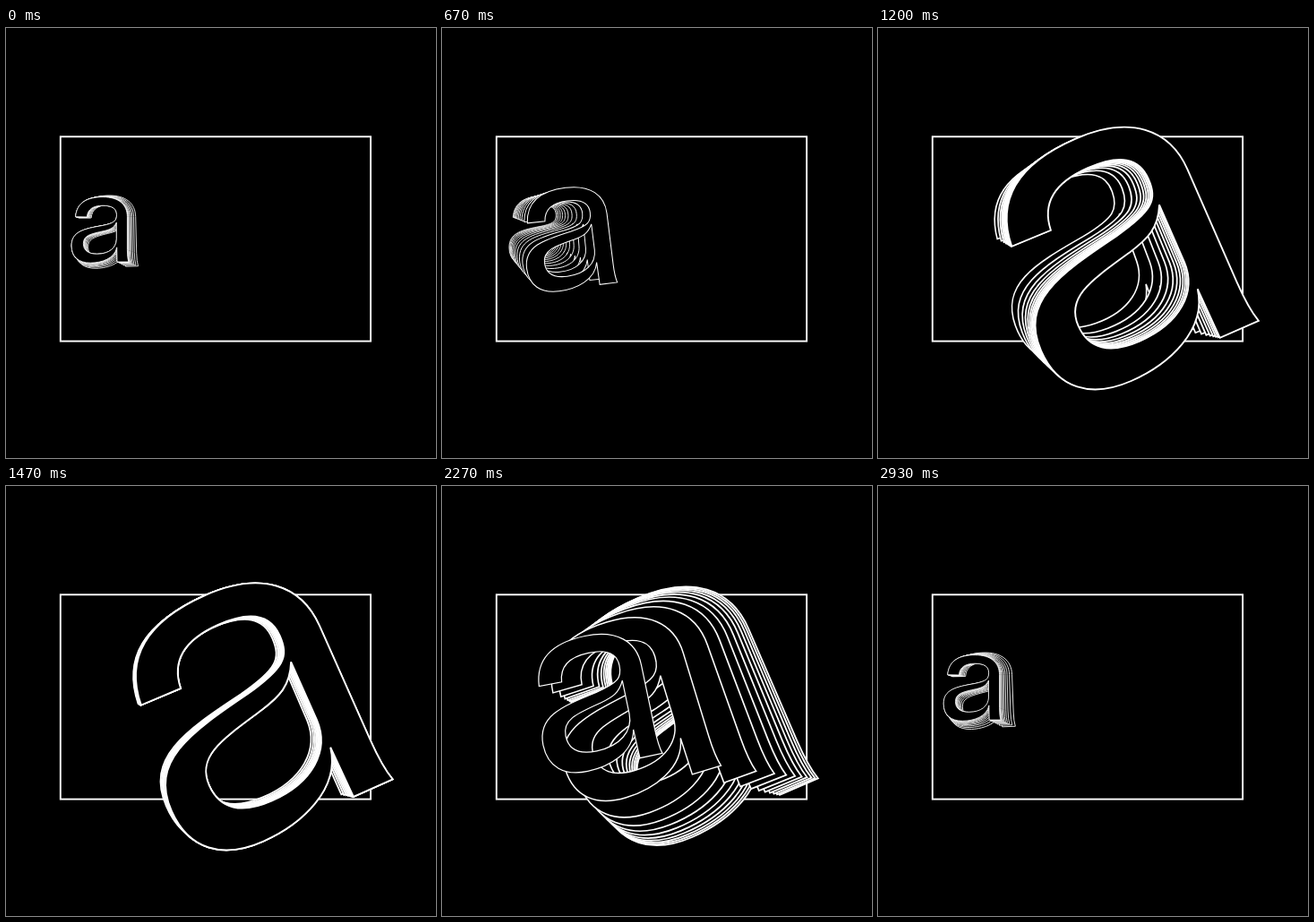
Animation, 480 px wide and 480 px high, one loop 2.99 s. Source, as an HTML page with a canvas:

```html
<!DOCTYPE html>
<html lang="en">
<head>
<meta charset="utf-8">
<title>Letter trail</title>
<style>
html, body { margin: 0; width: 100%; height: 100%; overflow: hidden; background: #000; }
canvas { display: block; }
</style>
</head>
<body>
<canvas id="stage" width="480" height="480"></canvas>
<script>
const ctx = document.getElementById('stage').getContext('2d');
const LOOP = 2990, CYCLE = 3000, FRAME = CYCLE / 45; // 15 pictures per second
const GROW = 20, SHRINK = 1498, SPAN = 1490;
const COPIES = 11, DELAY = 38;

// Letter outline, origin at the lower left corner of the stem
const letter = new Path2D(`
  M48,0 Q43,-18 43,-50 L43,-190
  C43,-240 8,-273 -60,-273 C-125,-273 -170,-250 -175,-190
  L-127,-189 C-124,-222 -100,-237 -60,-237
  C-20,-237 -2,-224 -2,-198 C-2,-172 -12,-163 -61,-153
  C-140,-139 -192,-128 -192,-68 C-192,-21 -162,4.5 -112,4.5
  C-65,4.5 -10,-14 -1,-61 L0,0 Z
  M-2.5,-166 L-2.5,-95 C-3,-58 -35,-33 -85,-33
  C-122,-33 -142,-48 -142,-77 C-142,-112 -110,-118 -55,-130
  C-30,-136 -14,-142 -2.5,-166 Z`);

const mix = (a, b, p) => a + (b - a) * p;

// Symmetric cubic Bezier easing (.9, 0, .1, 1), solved by bisection
function ease(x) {
  let lo = 0, hi = 1;
  for (let i = 0; i < 24; i++) {
    const s = (lo + hi) / 2, r = 1 - s;
    if (2.7 * s * r * r + 0.3 * s * s * r + s * s * s < x) lo = s;
    else hi = s;
  }
  return lo * lo * (3 - 2 * lo);
}

function progress(time) {
  const t = (time + CYCLE) % CYCLE;
  return t < SHRINK ? ease((t - GROW) / SPAN) : 1 - ease((t - SHRINK) / SPAN);
}

function drawLetter(p) {
  const lead = 1.7 * p / (1 + 0.7 * p); // turn and drop run ahead of the size
  const scale = mix(0.265, 1, p);
  ctx.save();
  ctx.translate(mix(124, 388, p), mix(261, 347, lead));
  ctx.rotate(-24 * lead * Math.PI / 180);
  ctx.scale(scale, scale);
  ctx.lineWidth = mix(0.8, 1.9, p) / scale;
  ctx.fill(letter, 'evenodd');
  ctx.stroke(letter);
  ctx.restore();
}

function draw() {
  const time = Math.floor((performance.now() % LOOP + 5) / FRAME) * FRAME;
  ctx.fillStyle = '#000';
  ctx.strokeStyle = '#fff';
  ctx.miterLimit = 4;
  ctx.fillRect(0, 0, 480, 480);
  ctx.lineWidth = 1.9;
  ctx.strokeRect(60.8, 121.3, 346.3, 228.3);
  for (let i = COPIES - 1; i >= 0; i--) drawLetter(progress(time - i * DELAY));
  requestAnimationFrame(draw);
}
draw();
</script>
</body>
</html>
```
